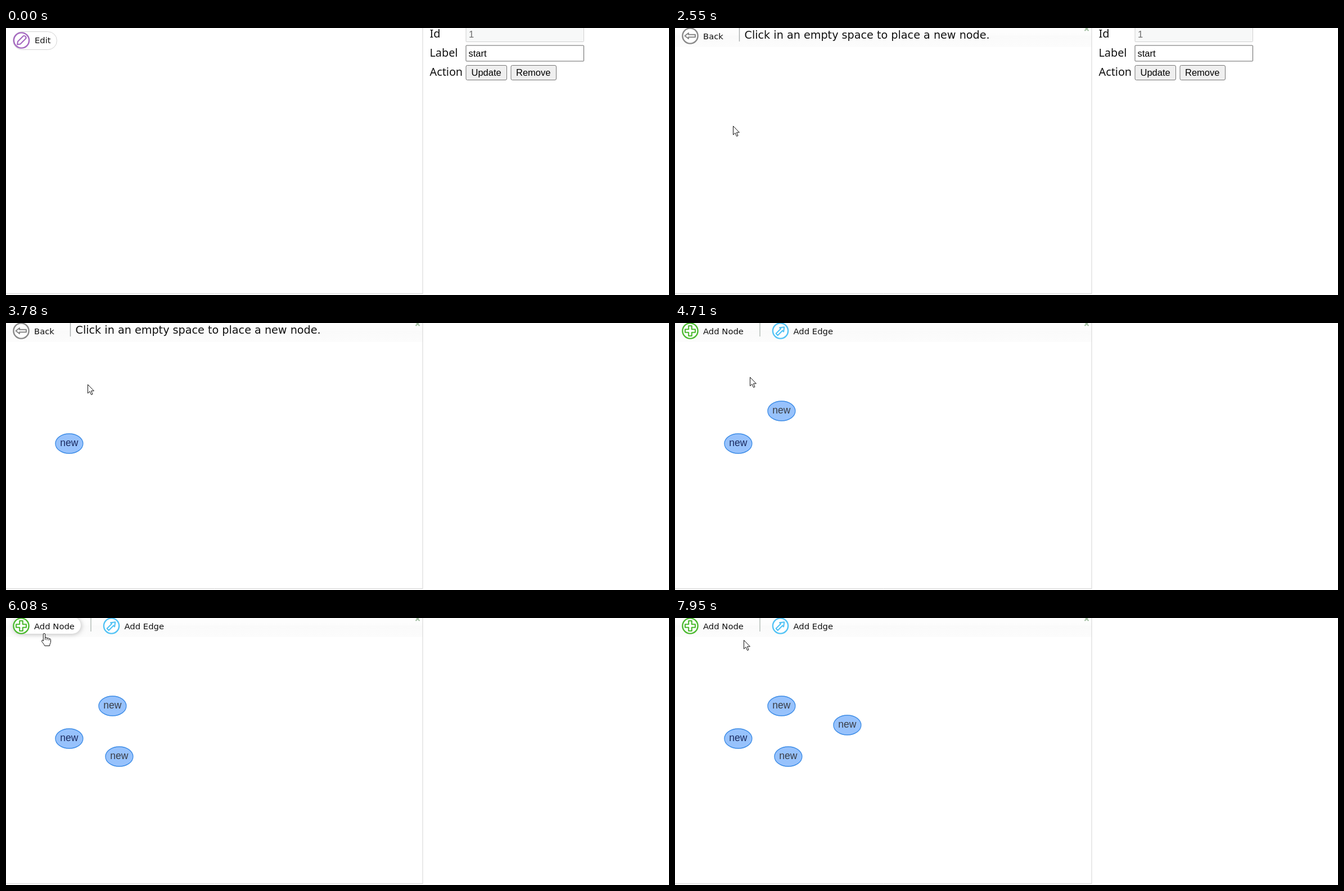
An HTML page with a canvas that plays this animation: 1179 by 475 pixels, repeating every 8 s.

```html
<!DOCTYPE html>
<html lang="en">
<head>
<meta charset="utf-8">
<title>Graph editor</title>
<style>
html, body { margin: 0; width: 100%; height: 100%; overflow: hidden; background: #fff; }
canvas { display: block; }
</style>
</head>
<body>
<canvas id="stage" width="1179" height="475"></canvas>
<script>
const ctx = document.getElementById('stage').getContext('2d');
const LOOP = 8000;
const FLASH = 70;    // how long a click shows
const TRAVEL = 400;  // pointer time between button and canvas
const ENTER = 130, EDIT_CLICK = 740, OPEN = 1330;
const HOME = { x: 68, y: 27 };
const BAR_FONT = '"DejaVu Sans", Verdana, sans-serif';
const FORM_FONT = '"Noto Sans", sans-serif';
const ARIAL = '"Liberation Sans", Arial, sans-serif';

// Each node: press the button, arrive at the spot, click to drop it.
const nodes = [
  { x: 112, y: 214, press: 2150, arrive: 2670, drop: 2734 },
  { x: 189, y: 156, press: 3425, arrive: 3944, drop: 4180 },
  { x: 201, y: 246, press: 4990, arrive: 5434, drop: 5434 },
  { x: 306, y: 190, press: 6130, arrive: 6540, drop: 7070 }
];

const move = (start, end, { x, y }) => ({ start, end, x, y });
const moves = [
  move(ENTER, 400, { x: 52, y: 24 }),
  move(600, EDIT_CLICK, { x: 15, y: 17 }),
  move(OPEN, 1400, { x: 50, y: 18 }),
  move(1740, 1800, HOME)
];
nodes.forEach((n, i) => {
  if (i) moves.push(move(n.press - FLASH - TRAVEL, n.press - FLASH, HOME));
  moves.push(move(n.arrive - TRAVEL, n.arrive, n));
});
moves.push(move(7400, 7950, { x: 122, y: 39 }));

const clicks = [EDIT_CLICK, ...nodes.flatMap(n => [n.press, n.drop])];
const isBorn = (n, t) => t >= n.drop + FLASH;

function pointer(t) {
  let x = 1012, y = 441;
  for (const m of moves) {
    const k = Math.min(1, Math.max(0, (t - m.start) / (m.end - m.start)));
    const ease = k * k * (3 - 2 * k);
    x += (m.x - x) * ease;
    y += (m.y - y) * ease;
  }
  return [Math.round(x), Math.round(y)];
}

function barKind(t) {
  if (t < OPEN) return 'edit';
  return nodes.some(n => t >= n.press + FLASH && !isBorn(n, t)) ? 'back' : 'add';
}

function text(str, x, y, size, font, color = '#111') {
  ctx.font = `${size}px ${font}`;
  ctx.fillStyle = color;
  ctx.fillText(str, x, y);
}

const barText = (str, x, y = 19.5, size = 14.8) => text(str, x, y, size, BAR_FONT);

function box(x, y, w, h, r, fill, stroke) {
  ctx.beginPath();
  ctx.roundRect(x, y, w, h, r);
  ctx.fillStyle = fill;
  ctx.fill();
  if (!stroke) return;
  ctx.strokeStyle = stroke;
  ctx.lineWidth = 1;
  ctx.stroke();
}

function line(x1, y1, x2, y2, color, width = 1) {
  ctx.beginPath();
  ctx.moveTo(x1, y1);
  ctx.lineTo(x2, y2);
  ctx.strokeStyle = color;
  ctx.lineWidth = width;
  ctx.stroke();
}

const plus = new Path2D('M-2.8-9H2.8V-2.8H9V2.8H2.8V9H-2.8V2.8H-9V-2.8H-2.8Z');
const arrow = new Path2D('M-9.5 0L-3-5V-2.2H9V2.2H-3V5Z');
const pencil = new Path2D('M-10.5 0L-6-3.2H7Q10-3.2 10 0T7 3.2H-6Z');

function icon(x, y, color, shape, turn = 0) {
  ctx.save();
  ctx.translate(x, y);
  ctx.beginPath();
  ctx.arc(0, 0, 13.6, 0, Math.PI * 2);
  ctx.fillStyle = '#fff';
  ctx.fill();
  ctx.strokeStyle = color;
  ctx.lineWidth = 2.4;
  ctx.stroke();
  ctx.rotate(turn * Math.PI / 180);
  ctx.lineWidth = 2.1;
  ctx.lineJoin = 'round';
  ctx.stroke(shape);
  ctx.restore();
}

function drawForm() {
  ['Id', 'Label', 'Action'].forEach((label, i) =>
    text(label, 753.5, 16.5 + i * 34, 19.8, FORM_FONT));
  box(818, -3.5, 209.5, 28, 1, '#f7f8f8', '#d0d0d0');
  text('1', 823, 17, 16.5, ARIAL, '#6c6c6c');
  box(818, 31, 209.5, 28, 1, '#fff', '#666');
  text('start', 822.5, 51, 16.5, ARIAL, '#000');
  box(818, 66.5, 72.5, 26, 2.5, '#efefef', '#767676');
  text('Update', 827.5, 85, 16.5, ARIAL, '#000');
  box(898, 66.5, 80.5, 26, 2.5, '#efefef', '#767676');
  text('Remove', 907, 85, 16.5, ARIAL, '#000');
}

function drawBack() {
  icon(27, 14, '#888', arrow);
  barText('Back', 50);
  line(114.5, 0, 114.5, 24, '#a8acac', 1.4);
  barText('Click in an empty space to place a new node.', 123.5, 19, 19.2);
}

function drawAdd(hover, canDelete) {
  if (hover) {
    ctx.save();
    ctx.shadowColor = 'rgba(0,0,0,.25)';
    ctx.shadowBlur = 8;
    ctx.shadowOffsetX = ctx.shadowOffsetY = 1;
    box(12, -2, 121, 30, 15, '#fff');
    ctx.restore();
  }
  icon(27, 14, '#4cba30', plus);
  barText('Add Node', 50);
  line(151, 0, 151, 24, '#b0bab4', 1.4);
  icon(187.5, 14, '#52c3f5', arrow, 135);
  barText('Add Edge', 210.5);
  if (!canDelete) return;
  line(310.5, 0, 310.5, 24, '#d0d0d0');
  icon(346.5, 14, '#fb7f22', plus, 45);
  barText('Delete selected', 370);
}

function drawBar(kind, hover, canDelete) {
  if (kind === 'edit') {
    box(12.5, 6.5, 78, 32, 16, '#fff', '#d3d3d3');
    icon(27.5, 22, '#a568c0', pencil, -45);
    barText('Edit', 51, 27);
    return;
  }
  const shade = ctx.createLinearGradient(0, -6, 0, 34);
  shade.addColorStop(0, '#fff');
  shade.addColorStop(0.48, '#fcfcfc');
  shade.addColorStop(0.5, '#fafafa');
  shade.addColorStop(1, '#fcfcfc');
  ctx.fillStyle = shade;
  ctx.fillRect(0, 0, 741, 34);
  line(728.5, -2, 735.5, 5, '#a3bfa3', 2.2);
  line(735.5, -2, 728.5, 5, '#a3bfa3', 2.2);
  if (kind === 'back') drawBack();
  else drawAdd(hover, canDelete);
}

function drawNode({ x, y }, color) {
  ctx.beginPath();
  ctx.ellipse(x + 0.4, y + 0.5, 24.5, 17.5, 0, 0, Math.PI * 2);
  ctx.fillStyle = '#97c2fc';
  ctx.fill();
  ctx.strokeStyle = '#3b8be6';
  ctx.lineWidth = 1.3;
  ctx.stroke();
  ctx.textAlign = 'center';
  text('new', x + 0.4, y + 4.7, 17.5, ARIAL, color);
  ctx.textAlign = 'left';
}

const arrowTip = new Path2D('M.5.5V16L4 12.7 6.6 18.6 9 17.6 6.5 11.8H11.4Z');
const hand = new Path2D('M-1.7 14V2Q-1.7.5 0 .5T1.7 2V8Q4.6 6.5 5 9 7.8 7.6 8.4 10 11.5 9 11.5 12V16.5Q9.8 19 9.5 22.5H.8Q0 20-4 15.3-5.2 12.5-3.3 12.2-2.4 12.2-1.7 14ZM1.7 8V12M5 9V12.5M8.4 10V13');

function drawPointer(x, y, shape) {
  ctx.save();
  ctx.translate(x, y);
  ctx.fillStyle = '#fff';
  ctx.fill(shape);
  ctx.strokeStyle = '#111';
  ctx.lineWidth = 1;
  ctx.lineJoin = 'round';
  ctx.stroke(shape);
  ctx.restore();
}

function draw(t) {
  const [x, y] = pointer(t);
  const selected = !isBorn(nodes[0], t);
  const over = x >= 12 && x <= 133 && y < 30;

  ctx.fillStyle = '#fff';
  ctx.fillRect(0, 0, 1179, 475);
  drawBar(barKind(t), over, selected);
  line(741, 0, 741, 473, '#d3d3d3');
  line(0, 472.5, 741, 472.5, '#d3d3d3');
  if (selected) drawForm();
  nodes.forEach((n, i) => {
    if (isBorn(n, t)) drawNode(n, i ? '#3a3d45' : '#1c2b60');
  });
  if (clicks.some(c => t >= c && t < c + FLASH)) {
    ctx.beginPath();
    ctx.arc(x, y, 15, 0, Math.PI * 2);
    ctx.fillStyle = 'rgba(255,255,0,.5)';
    ctx.fill();
  }
  if (t > ENTER) drawPointer(x, y, over ? hand : arrowTip);
}

const start = performance.now();
function tick() {
  draw((performance.now() - start) % LOOP);
  requestAnimationFrame(tick);
}
tick();
</script>
</body>
</html>
```
